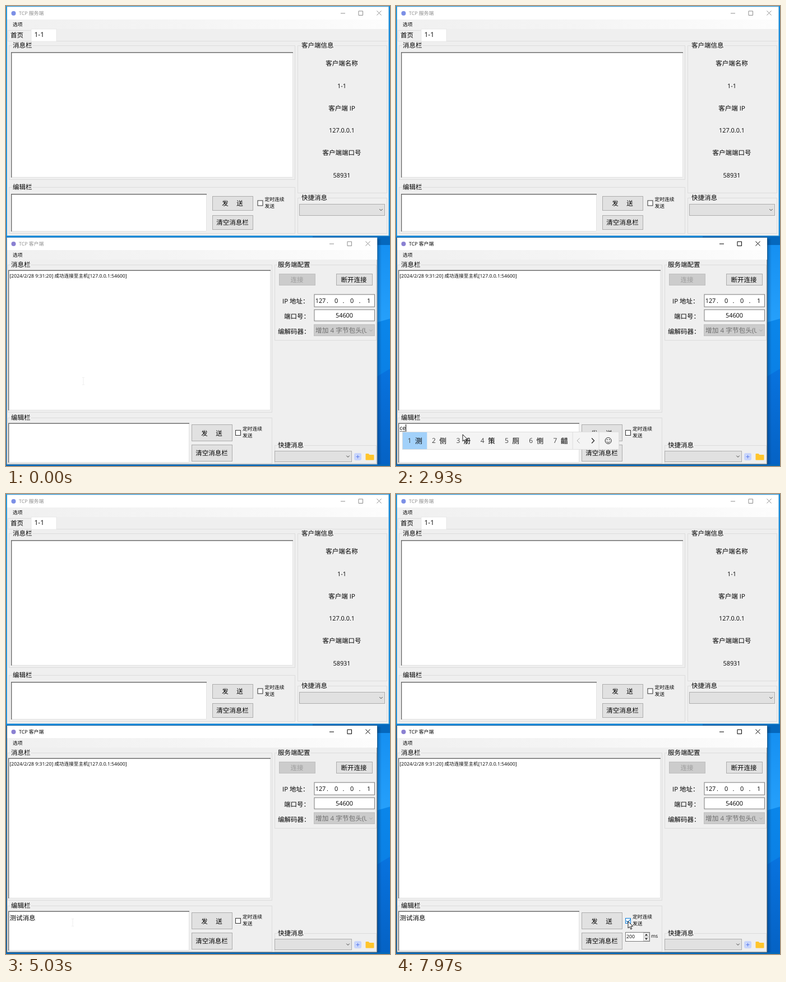
These frames come from a looping animation (685x818 px, 8000 ms). An HTML page:

```html
<!DOCTYPE html>
<html lang="zh-CN">
<head>
<meta charset="utf-8">
<title>TCP</title>
<style>
html, body { margin: 0; width: 100%; height: 100%; overflow: hidden; background: #0a83dc; }
svg { display: block; width: 100%; height: 100%; }
text { font-family: "Open Sans", "Noto Sans CJK SC", "Noto Sans CJK", sans-serif; white-space: pre; text-rendering: geometricPrecision; }
#send.hover > rect { fill: #e5f1fb; stroke: #0078d7; }
</style>
</head>
<body>
<svg id="stage" viewBox="0 0 685 818" lang="zh-CN"></svg>
<script>
const FACE = '#efefef', LOOP = 8000;
const stage = document.getElementById('stage');

const rect = (x, y, w, h, fill, stroke, extra = '') =>
  `<rect x="${x}" y="${y}" width="${w}" height="${h}" fill="${fill}"${stroke ? ` stroke="${stroke}"` : ''} ${extra}/>`;
const path = (d, stroke, fill = 'none', width = 1) =>
  `<path d="${d}" fill="${fill}" stroke="${stroke}" stroke-width="${width}"/>`;
// y is the vertical middle of the glyphs
const label = (x, y, s, size = 11.5, anchor = 'start', fill = '#000') =>
  `<text x="${x}" y="${y + size * 0.37}" font-size="${size}" text-anchor="${anchor}" fill="${fill}">${s}</text>`;
const centred = (x, y, s, size, fill) => label(x, y, s, size, 'middle', fill);

const group = (x, y, r, b, tx, s) =>
  rect(x + .5, y + .5, r - x - 1, b - y - 1, 'none', '#dcdcdc') +
  rect(tx - 1, y - 2, s.length * 11.5 + 2, 5, FACE) + label(tx, y, s);

const field = (x, y, r, b) =>
  rect(x, y, r - x, b - y, '#fff') +
  path(`M${r - .5} ${y}V${b - .5}H${x}`, '#e3e3e3') +
  path(`M${x + .7} ${b}V${y + .7}H${r}`, '#6c6c6c', 'none', 1.4);

const box = (x, y, r, b, fill = '#e1e1e1', stroke = '#adadad') =>
  rect(x + .5, y + .5, r - x - 1, b - y - 1, fill, stroke);

const chevron = (x, y, c = '#444') => path(`M${x - 2.7} ${y - 1.4}l2.7 2.7 2.7-2.7`, c);
const combo = (x, y, r, b) => box(x, y, r, b) + chevron(r - 7, (y + b) / 2);
const sendText = (x, y) => centred(x - 13, y, '发') + centred(x + 13, y, '送');
const checkbox = (x, y, extra = '') =>
  rect(x + .5, y + .5, 9, 9, '#fff', '#333', extra) +
  label(x + 13, y - 2, '定时连续', 8.75) + label(x + 13, y + 10, '发送', 8.75);

const titleBar = (y, right, title, icon, id) =>
  rect(2, y, right - 2, 22, '#fff') +
  `<circle cx="13.5" cy="${y + 11}" r="4" fill="${icon}"/>` +
  `<g id="${id}" fill="#8d8d8d" stroke="#8d8d8d">` +
  `<text x="23" y="${y + 14.2}" font-size="8.8" stroke="none">${title}</text>` +
  `<path fill="none" d="M${right - 85} ${y + 11}h8M${right - 53} ${y + 7}h7.500v7.500h-7.500zM${right - 20.5} ${y + 6.5}l8 8m0-8l-8 8"/></g>` +
  rect(2, y + 22, right - 2, 17, 'url(#menu)') + label(12, y + 30.5, '选项', 8.75);

const desktop =
  rect(0, 0, 685, 818, '#0a83dc') + rect(0, 0, 3, 818, 'url(#edge)') +
  rect(547, 409, 138, 16, '#0568bd') + rect(660, 425, 25, 140, 'url(#sky)') +
  path('M660 563L685 556V818H660Z', 'none', 'url(#mid)') +
  path('M660 660L685 645V818H660Z', 'none', 'url(#deep)') +
  rect(662, 414, 8, 404, 'url(#shade)') + rect(0, 815, 685, 3, '#0668b8');

const server =
  rect(1.5, .8, 681.5, 408, FACE, '#3e9fd8') + titleBar(2, 682, 'TCP 服务端', '#7c8fe6', 'serverTitle') +
  path('M3 62.5H45M90 62.5H681', '#dedede') + path('M3.5 62V43.5H44.5', '#dcdcdc') +
  rect(45, 41, 45, 22, '#fff', '#dcdcdc', 'stroke-width=".6"') + label(8, 52, '首页') + label(50.5, 51, '1-1', 12) +
  group(5, 70, 516, 309, 12, '消息栏') + field(9, 82, 512, 305) +
  group(5, 322, 516, 405, 12, '编辑栏') + field(9, 334, 358, 401) +
  box(368, 338, 441, 364) + sendText(404, 351) +
  box(368, 372, 441, 398) + centred(404, 385, '清空消息栏') + checkbox(448.5, 345.5) +
  group(520, 70, 680, 333, 527, '客户端信息') +
  ['客户端名称', '1-1', '客户端 IP', '127.0.0.1', '客户端端口号', '58931']
    .map((s, i) => centred(599, 102 + i * 39.7, s, i % 2 ? 10.9 : 11.5)).join('') +
  group(520, 341, 680, 405, 527, '快捷消息') + combo(523, 352, 676, 373);

const client =
  rect(1.5, 412, 660.5, 403, FACE, '#8b9aa5', 'id="frame"') + titleBar(412, 662, 'TCP 客户端', '#8a80d2', 'clientTitle') +
  group(3, 460, 475, 723, 9, '消息栏') + field(4, 469.5, 472, 719) +
  label(6.5, 480, '[2024/2/28 9:31:20] 成功连接至主机[127.0.0.1:54600]', 8.6) +
  group(3, 732, 475, 814, 9, '编辑栏') + field(4, 741.5, 327, 812) +
  `<g id="send">${box(331, 744, 404, 774)}${sendText(367, 760)}</g>` +
  box(331, 780, 404, 810) + centred(367, 795, '清空消息栏') +
  checkbox(409, 754, 'id="check"') +
  `<g id="interval"><path d="M411 759l2.3 2.6 4.7-5" fill="none" stroke="#0068bf" stroke-width="1.2"/>` +
  box(409, 779, 453, 796, '#fff', '#7a7a7a') + label(411, 787, '200', 8.7) +
  box(441, 780, 452, 787.5, '#f0f0f0', '#c4c4c4') + box(441, 787.5, 452, 795, '#f0f0f0', '#c4c4c4') +
  path('M443.8 785.2h5.4l-2.7-3zM443.8 789.8h5.4l-2.7 3z', 'none', '#222') + label(455, 786, 'ms', 8.6) + '</g>' +
  group(479, 460, 661, 595, 485, '服务端配置') +
  box(487, 476, 552, 497, '#cccccc', '#bfbfbf') + centred(519, 487, '连接', 11.5, '#9b9b9b') +
  box(589, 476, 654, 497) + centred(620.5, 487, '断开连接') +
  label(493, 525, 'IP 地址：') + label(496, 552, '端口号：') + label(485, 579, '编解码器：') +
  box(549.5, 512.5, 658, 535.5, '#fff', '#7a7a7a') +
  [['127', 561], ['.', 573.5], ['0', 589], ['.', 602], ['0', 617], ['.', 631], ['1', 647]]
    .map(([s, x]) => centred(x, 524, s, 10.9)).join('') +
  box(549.5, 539.5, 658, 560.5, '#fff', '#7a7a7a') + centred(603.5, 550, '54600', 10.9) +
  box(549, 566, 658, 587, '#cccccc', '#bfbfbf') +
  `<g clip-path="url(#codec)">${label(552, 577, '增加 4 字节包头(Utf', 11.7, 'start', '#6d6d6d')}</g>` + chevron(651, 577, '#a5a5a5') +
  group(479, 781, 661, 814, 485, '快捷消息') + combo(479, 791, 617, 811) +
  rect(621, 795, 13, 13, '#c8d5fb', '', 'rx="3"') + path('M624.5 801.5h6m-3-3v6', '#5b7bea') +
  path('M641.5 797q0-1 1-1h4l2 2h7q1 0 1 1v7.500q0 1-1 1h-13q-1 0-1-1z', 'none', '#ffc52b');

const overlay =
  '<text id="typed" x="6.5"/><path id="underline" stroke="#000" stroke-width=".9" stroke-dasharray="1.5 1"/>' +
  '<path id="caret" stroke="#000"/><g id="ime"></g>' +
  `<g id="beam">${path('M-2-6.500h1.500l.5.5.5-.5h1.500M0-6V6M-2 6.500h1.500l.5-.5.5.5h1.500', '#ededed')}</g>` +
  `<g id="arrow">${path('M0 0V12L2.800 9.500 4.800 14 6.700 13.200 4.800 8.800H8.600Z', '#000', '#fff', .9)}</g>`;

const gradient = (id, dir, ...stops) => `<linearGradient id="${id}" x1="0" y1="0" ${dir}="1" ${dir === 'y2' ? 'x2="0"' : 'y2="0"'}>` +
  stops.map((c, i) => `<stop offset="${i / (stops.length - 1)}" stop-color="${c}"/>`).join('') + '</linearGradient>';

stage.innerHTML = '<defs>' + gradient('menu', 'x2', '#f0f0f0', '#f5f5f5', '#fdfdfd') +
  gradient('sky', 'y2', '#1590f2', '#26a0fb') + gradient('mid', 'y2', '#0a86ea', '#0a78de') +
  gradient('deep', 'y2', '#0873df', '#0562c4') + gradient('shade', 'x2', '#00285066', '#00285000') +
  gradient('edge', 'y2', '#1296e4', '#0a83dc', '#0870c4') +
  '<clipPath id="codec"><rect x="550" y="566" width="93.500" height="22"/></clipPath></defs>' +
  desktop + server + client + overlay;

const el = Object.fromEntries([...stage.querySelectorAll('[id]')].map(e => [e.id, e]));
const show = (e, on) => e.setAttribute('visibility', on ? 'visible' : 'hidden');
const set = (e, attrs) => { for (const k in attrs) e.setAttribute(k, attrs[k]); };

const FOCUS = 1800, COMMIT = 4350, PRESS = 7060, RELEASE = 7190;
const keys = [
  [2700, 'c', '才 从 成 出 次 吃 参'],
  [2850, 'ce', '测 侧 册 策 厕 恻 齰'],
  [3080, "ce's", '测试 测算 侧 册 策 厕 恻'],
  [3230, "ce'sh", '测试 侧式 侧室 侧视 策士 侧 册'],
  [3400, "ce'shi", '测试 侧式 侧室 侧视 策士 侧 册'],
  [3520, "ce'shi'x", '测试下 测试 侧式 侧室 侧视 策士 侧'],
  [3650, "ce'shi'xi", '测试系 测试 侧式 侧室 侧视 策士 侧'],
  [3740, "ce'shi'xia", '测试下 测试 侧式 侧室 侧视 策士 侧'],
  [3850, "ce'shi'xiao", '测试小 测试 侧式 测试下 侧室 侧视 策士'],
  [3980, "ce'shi'xiao'x", '测试小心 测试 侧式 测试下 侧室 侧视 策士'],
  [4080, "ce'shi'xiao'xi", '测试消息 测试 侧式 测试下 侧室 侧视 策士'],
];

function candidateBar(words) {
  let x = 0, cells = '';
  words.split(' ').forEach((word, i) => {
    const w = 30.5 + 12.8 * word.length;
    if (!i) cells += rect(0, 758, w, 30, '#a2d1fa');
    cells += label(x + 8.8, 773, i + 1, 12, 'start', '#444') + label(x + 22, 773, word, 12.8);
    x += w;
  });
  return rect(-.5, 757.5, x + 83, 31, '#f4f4f4', '#dedede') + cells +
    path(`M${x} 758v30M${x + 47} 758v30`, '#dcdcdc') +
    path(`M${x + 12.5} 768.500l-4.500 4.500 4.500 4.500`, '#aaa') +
    path(`M${x + 34} 768.500l4.500 4.500-4.500 4.500`, '#222', 'none', 1.2) +
    `<circle cx="${x + 63.5}" cy="773" r="5.500" fill="none" stroke="#222"/>` +
    path(`M${x + 60.5} 774.500q3 3.500 6 0`, '#222') +
    path(`M${x + 61.5} 770.300v1.800m4-1.800v1.800`, '#222', 'none', 1.3);
}

let shownKey;
function typing(t) {
  const committed = t >= COMMIT;
  const key = committed ? null : keys.filter(k => k[0] <= t).pop();
  const id = committed ? 'done' : key ? key[1] : '';
  if (id !== shownKey) {
    shownKey = id;
    el.typed.textContent = committed ? '测试消息' : id;
    set(el.typed, committed ? { y: 757.7, 'font-size': 11.5 } : { y: 754.3, 'font-size': 10.3 });
    const end = 6.5 + (id ? el.typed.getComputedTextLength() : 0);
    set(el.caret, { d: committed ? `M${end + .5} 747v15` : `M${end + .5} 744v13` });
    set(el.underline, { d: key ? `M7 756.500H${end}` : '' });
    el.ime.innerHTML = key ? candidateBar(key[2]) : '';
    if (key) set(el.ime, { transform: `translate(${Math.round(end * 1.06 - 6.5)} 0)` });
  }
  const since = t - (committed ? COMMIT : FOCUS);
  show(el.caret, key || (t >= FOCUS && t < PRESS && since % 1060 < 530));
  return !!key;
}

// [time, x, y] stops of the pointer
const route = [[0, 138, 667], [300, 138, 667], [1000, 121, 762], [2600, 119, 762], [5150, 119, 762],
  [5700, 390, 761], [5870, 404.5, 760], [6150, 414, 760], [LOOP, 414, 760]];
function pointer(t) {
  const i = Math.max(1, route.findIndex(p => p[0] > t));
  const [a, b] = [route[i - 1], route[i]];
  const k = (t - a[0]) / (b[0] - a[0]);
  return [a[1] + (b[1] - a[1]) * k, a[2] + (b[2] - a[2]) * k];
}

function draw(now) {
  const t = now % LOOP, active = t >= FOCUS;
  const composing = typing(t), [x, y] = pointer(t);
  const tint = active ? '#000' : '#8d8d8d';
  set(el.clientTitle, { fill: tint, stroke: tint });
  set(el.frame, { stroke: active ? '#3f5260' : '#8b9aa5' });

  const isArrow = composing || x > 327;
  show(el.arrow, isArrow);
  show(el.beam, !isArrow);
  set(isArrow ? el.arrow : el.beam, { transform: `translate(${x} ${y})` });

  el.send.classList.toggle('hover', x > 331 && x < 406);
  const pressed = t >= PRESS && t < RELEASE;
  set(el.check, { fill: pressed ? '#b5daf8' : '#fff', stroke: pressed ? '#005499' : x > 409 ? '#0078d7' : '#333' });
  show(el.interval, t >= RELEASE);
}

const start = performance.now();
function tick() {
  draw(performance.now() - start);
  requestAnimationFrame(tick);
}
tick();
</script>
</body>
</html>
```
